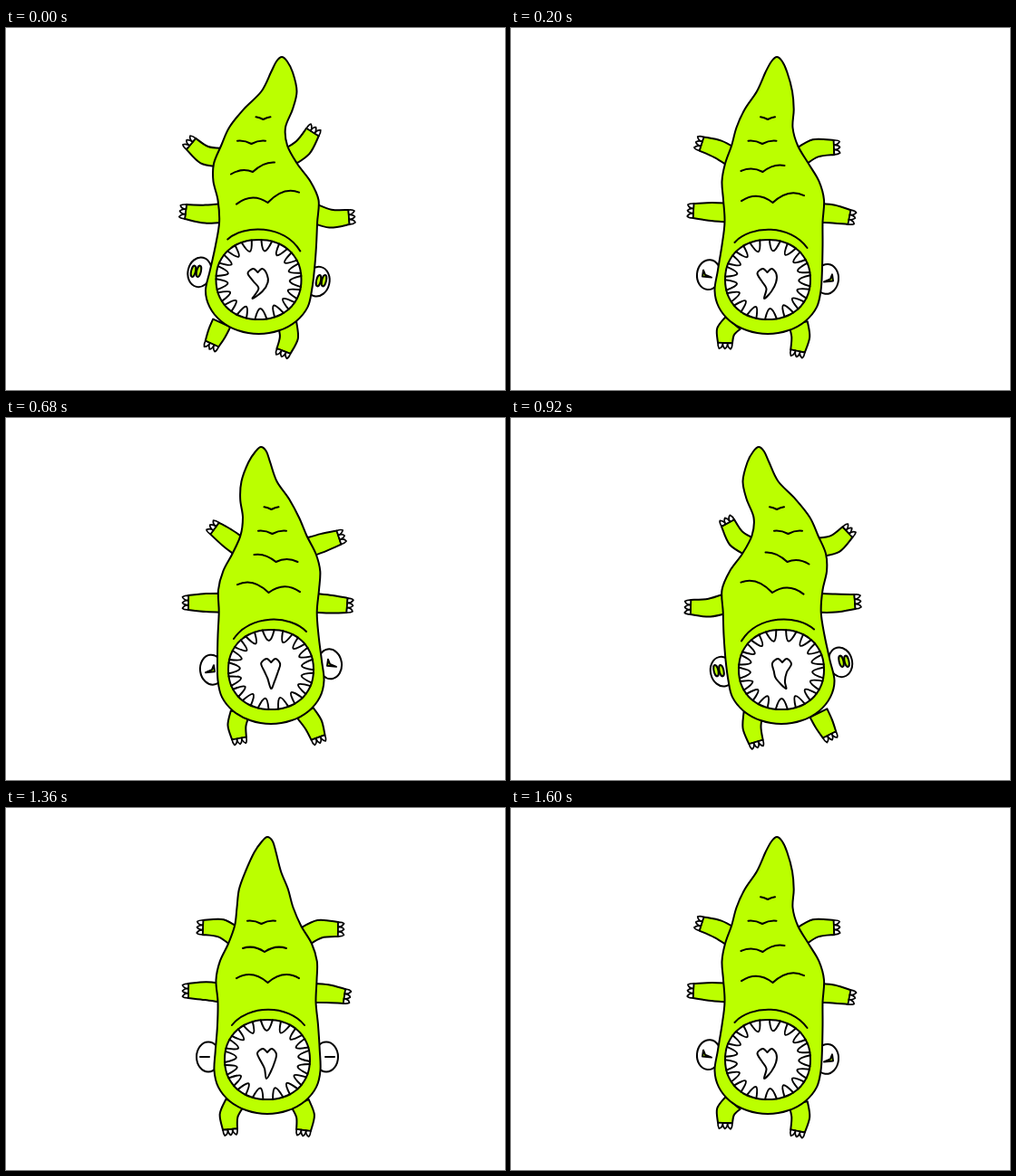
An HTML page that plays this animation: 550 px wide and 400 px high, repeating every 1840 ms.

```html
<!DOCTYPE html>
<html lang="en">
<head>
<meta charset="utf-8">
<title>Swaying crocodile</title>
<style>
  html, body { margin: 0; width: 100%; height: 100%; overflow: hidden; background: #fff; }
  svg { display: block; width: 550px; height: 400px; }
  path, ellipse { stroke: #000; stroke-width: 2; stroke-linejoin: round; stroke-linecap: round; }
  .skin { fill: #bf0; }
  .white { fill: #fff; }
  .line { fill: none; }
  .claw { fill: #fff; stroke-width: 1.7; }
  .pose { visibility: hidden; animation: 1840ms step-end infinite; }
  .right { animation-name: right; }
  .rightish { animation-name: rightish; }
  .middle { animation-name: middle; }
  .leftish { animation-name: leftish; }
  .left { animation-name: left; }
  @keyframes right { 0% { visibility: visible } 10.869%, 100% { visibility: hidden } }
  @keyframes rightish {
    0%, 23.913% { visibility: hidden }
    10.869%, 86.956%, 100% { visibility: visible }
  }
  @keyframes middle {
    0%, 36.956%, 86.956%, 100% { visibility: hidden }
    23.913%, 73.913% { visibility: visible }
  }
  @keyframes leftish {
    0%, 50%, 73.913%, 100% { visibility: hidden }
    36.956%, 60.869% { visibility: visible }
  }
  @keyframes left {
    0%, 60.869%, 100% { visibility: hidden }
    50% { visibility: visible }
  }
</style>
</head>
<body>
<svg id="stage" viewBox="0 0 550 400"></svg>
<script>
// Every pose bends one spine; widths along it are shared by all
const rows = [33, 70, 110, 150, 190, 240, 290];
const widths = [0, 24, 39, 54, 62, 73, 92, 107, 111, 108, 111, 115, 117];
const hips = [2.83, 4.3];

// legs: paw x, paw y, knee bend; left and right for each pair from tail to head
const poses = {
  right: {
    spine: [304, 301, 277, 275, 289, 286.5, 278.5], tilt: 13, ridges: [288.5, 272, 270.5, 283.5],
    legs: [[204, 128, -5], [338, 115, 4], [198, 203, -2], [378, 209, 4], [227, 349, 0], [306, 357, -4]],
    phase: 3, curl: 1, eye: 'slits'
  },
  rightish: {
    spine: [293, 290.5, 279.5, 282, 289.5, 288, 283], tilt: 6, ridges: [288.5, 277.5, 277, 283],
    legs: [[210, 128, 2], [356, 132, -5], [201, 202, 0], [373, 209, -1], [236, 348, 4], [316, 357, -3]],
    phase: 2, curl: 0.5, eye: 'tick', look: 1
  },
  middle: {
    spine: [288, 283.5, 285.5, 291, 287, 288.5, 288], tilt: 0, ridges: [288.5, 285, 281.5],
    legs: [[217, 132, 5], [366, 134, -5], [201, 202, 1], [373, 208, -1], [247, 355, 4], [328, 356, -4]],
    phase: -6, curl: 0, eye: 'lid'
  },
  leftish: {
    spine: [281, 279, 292, 295.5, 289.5, 289, 292], tilt: -8, ridges: [289.5, 297.5, 293.5, 292.5],
    legs: [[230, 122, 0], [367, 132, 0], [201, 204, 0], [376, 207, 0], [257, 354, 3], [344, 353, -2]],
    phase: -8, curl: -0.2, eye: 'tick', look: -1
  },
  left: {
    spine: [273, 275, 298.5, 301, 288, 290, 298], tilt: -13, ridges: [288, 304.5, 305.5, 293],
    legs: [[239, 116, -5], [371, 126, 5], [198, 209, -3], [379, 203, 1], [270, 358, 3], [351, 350, 0]],
    phase: 5, curl: -1, eye: 'slits'
  }
};

const fix = p => p.map(n => n.toFixed(1)).join(' ');
const path = (cls, d) => `<path class="${cls}" d="${d}"/>`;
const oval = (cls, x, y, rx, ry, turn) =>
  `<ellipse class="${cls}" rx="${rx}" ry="${ry}" transform="translate(${x} ${y}) rotate(${turn})"/>`;

// Cubic blend of evenly indexed keys
function sample(keys, t) {
  const i = Math.min(Math.floor(t), keys.length - 2), f = t - i;
  const [a, b, c, d] = [-1, 0, 1, 2].map(k => keys[Math.max(0, Math.min(keys.length - 1, i + k))]);
  return b + f * (c - a + f * (2 * a - 5 * b + 4 * c - d + f * (3 * (b - c) + d - a))) / 2;
}

// Smooth curve through the points
function curve(pts, closed = false, start = 'M') {
  const n = pts.length;
  const at = i => closed ? pts[(i + n) % n] : pts[Math.max(0, Math.min(n - 1, i))];
  let d = start + fix(pts[0]);
  for (let i = 0; i < (closed ? n : n - 1); i++) {
    const [a, b, c, e] = [at(i - 1), at(i), at(i + 1), at(i + 2)];
    d += 'C' + fix(b.map((v, k) => v + (c[k] - a[k]) / 6)) + ' ' +
      fix(c.map((v, k) => v - (e[k] - b[k]) / 6)) + ' ' + fix(c);
  }
  return d + (closed ? 'Z' : '');
}

// Point on the body's side at spine position t
const edge = (spine, t, side, inset = 0) =>
  [sample(spine, t) + side * (sample(widths, t * 2) / 2 - inset), sample(rows, t)];

function body({ spine }) {
  const flank = side => [[spine[0] + side * 6, 37],
    ...widths.slice(1).map((w, i) => edge(spine, (i + 1) / 2, side))];
  const chin = Array.from({ length: 7 }, (_, i) => {
    const a = (i + 1) * Math.PI / 8;
    return [spine[6] + 58.5 * Math.cos(a), 290 + 48 * Math.sin(a)];
  });
  return path('skin', curve([[spine[0], 32], ...flank(1), ...chin, ...flank(-1).reverse()], true));
}

function leg([x, y, bend], i, { spine }) {
  const side = i % 2 ? 1 : -1;
  const hip = i < 4 ? edge(spine, hips[i >> 1], side, 6)
    : [288 + 1.5 * (spine[6] - 288) + side * 36, 326];
  const paw = [x, y];
  const unit = (a, b) => {
    const l = Math.hypot(b[0] - a[0], b[1] - a[1]);
    return [(b[0] - a[0]) / l, (b[1] - a[1]) / l];
  };
  // Step from p: u along direction d, v across it
  const step = (p, d, u, v) => [p[0] + d[0] * u - d[1] * v, p[1] + d[1] * u + d[0] * v];
  const axis = unit(hip, paw);
  const knee = step([(hip[0] + x) / 2, (hip[1] + y) / 2], axis, 0, bend);
  const aim = unit(knee, paw);
  const rim = s => [step(hip, unit(hip, knee), 0, 10.5 * s), step(knee, axis, 0, 10 * s), step(paw, aim, 0, 8 * s)];
  const claw = j => {
    const p = (u, v) => fix(step(paw, aim, u, j * 5.3 + v));
    return path('claw', `M${p(0, -2.6)}Q${p(5, -2.8)} ${p(6.5, j)}Q${p(4, 2.8)} ${p(0, 2.6)}Z`);
  };
  return path('skin', curve(rim(1)) + curve(rim(-1).reverse(), false, 'L') + 'Z') +
    [-1, 0, 1].map(claw).join('');
}

function eye(side, { spine, tilt, eye: kind, look }) {
  const x = spine[6] + side * 65, y = 275 + side * tilt * 0.4;
  const at = (dx, dy) => fix([x + dx, y + dy]);
  const white = oval('white', x, y, 13, 16.5, tilt);
  if (kind === 'slits')
    return white + [1, 7].map(d => oval('skin', x + side * d, y - 1, 2.4, 6.3, tilt)).join('');
  if (kind === 'lid') return white + path('line', `M${at(-side, 0)}L${at(side * 9, 0)}`);
  const s = side * look, out = side * 2;
  return white + path('skin', `M${at(out + s * 4, -5)}L${at(out + s * 5, 2)}L${at(out - s * 5, 3)}L${at(out + s * 2, 0)}Z`);
}

// Two arcs meeting in a notch
function ridge(x, y, half, tilt) {
  const lift = half ** 2 / 95;
  const arc = s => {
    const end = [x + s * half, y - 2 - half / 12 - s * tilt / 2];
    return `M${fix(end)}Q${fix([x + s * half / 2, (end[1] + y) / 2 - lift])} ${fix([x, y])}`;
  };
  return path('line', arc(-1) + arc(1));
}

function ridges({ spine, tilt, ridges }) {
  const c = (spine[6] + 290) / 2;
  const brow = `M${fix([c - 40, 240 - tilt / 2])}C${fix([c - 22, 217])} ${fix([c + 22, 217])} ${fix([c + 40, 240 + tilt / 2])}`;
  const sizes = [[193, 34.5, tilt], [159, 24, tilt], [128, 15.5, 0], [101, 8, 0]];
  return path('line', brow) + ridges.map((x, i) => ridge(x, ...sizes[i])).join('');
}

function mouth({ spine, phase }) {
  const bend = v => Math.sign(v) * Math.abs(v) ** 0.93;
  const at = (a, k = 1) => [spine[6] + 47 * k * bend(Math.cos(a)), 278 + 44 * k * bend(Math.sin(a))];
  const ring = Array.from({ length: 36 }, (_, i) => at(i * Math.PI / 18));
  let out = path('white', curve(ring, true));
  for (let i = 0; i < 17; i++) {
    const u = phase * Math.PI / 180 + i * 2 * Math.PI / 17;
    const a = u - 0.09 * Math.sin(2 * u);   // teeth crowd towards the sides
    out += path('line', `M${fix(at(a - 0.12))}C${fix(at(a - 0.05, 0.64))} ${fix(at(a + 0.05, 0.64))} ${fix(at(a + 0.12))}`);
  }
  return out;
}

// Heart whose point curls sideways
function tongue({ spine, curl }) {
  const heart = [[0, -8], [-5, -12], [-11, -7], [-7, 2], [-3, 10], [-1, 21], [4, 13], [8, 3], [10, -6], [5, -12], [0, -8]];
  return path('white', curve(heart.map(([x, y]) =>
    [spine[6] + x - curl + (y > 0 ? 5 * curl * Math.sin(Math.PI * y / 14) : 0), 278 + y])));
}

const draw = p => p.legs.map((l, i) => leg(l, i, p)).join('') +
  eye(-1, p) + eye(1, p) + body(p) + ridges(p) + mouth(p) + tongue(p);

document.getElementById('stage').innerHTML = Object.entries(poses)
  .map(([name, p]) => `<g class="pose ${name}">${draw(p)}</g>`).join('');
</script>
</body>
</html>
```
